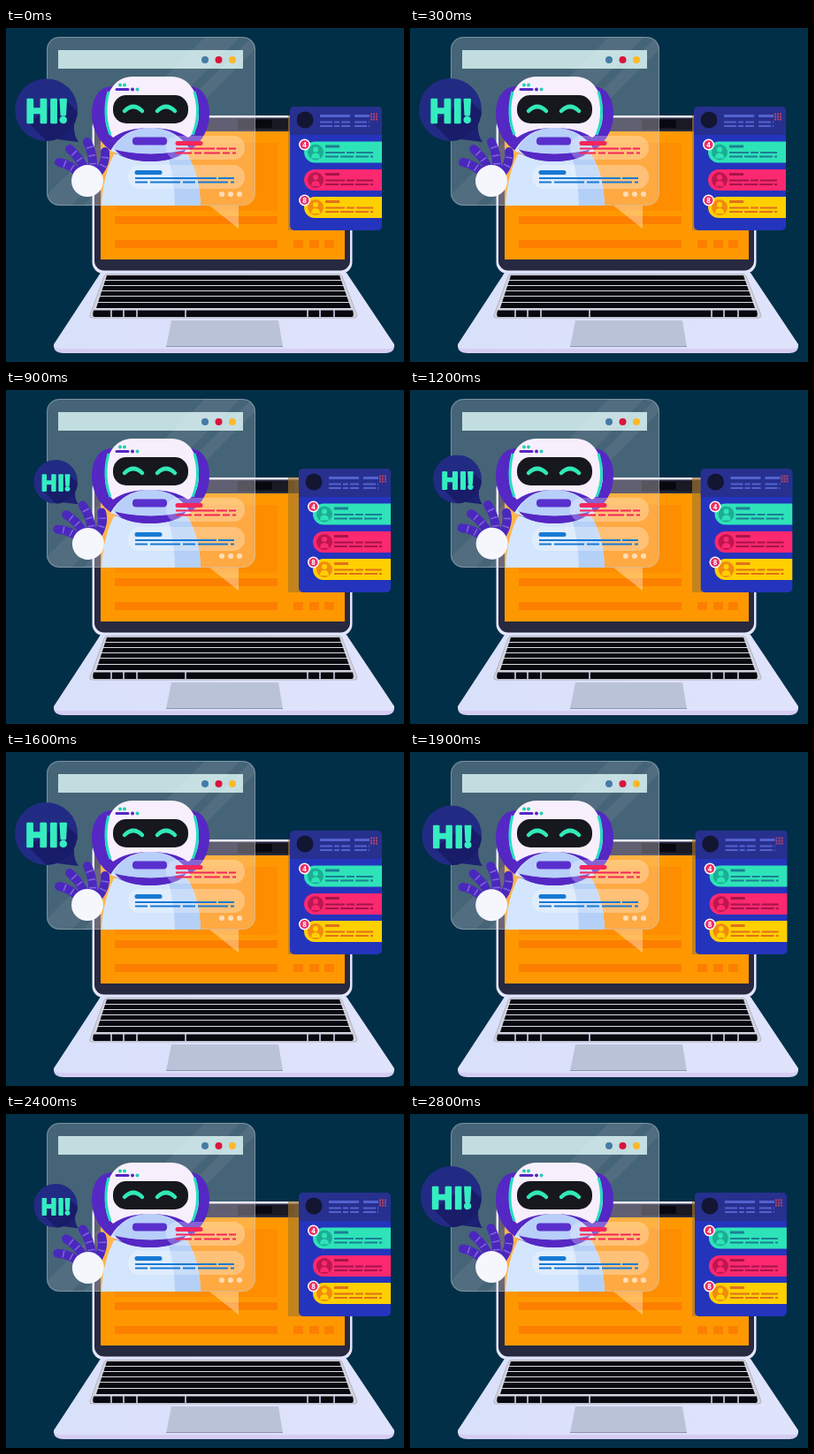
Recreate the animation shown at these times as an HTML page. Size 450 by 378 pixels, loop 2.9 s.

```html
<!DOCTYPE html>
<html lang="en">
<head>
<meta charset="utf-8">
<title>Chat robot</title>
<style>
html, body { margin: 0; width: 100%; height: 100%; overflow: hidden; background: #012f47; }
svg { display: block; }
text { font-family: "Open Sans", sans-serif; text-anchor: middle; }
</style>
</head>
<body>
<svg width="450" height="378" viewBox="0 0 450 378">
  <defs>
    <clipPath id="glass"><rect x="46" y="10" width="236" height="191" rx="14"/></clipPath>
    <clipPath id="card"><rect x="321" y="89" width="104" height="140" rx="5"/></clipPath>
    <clipPath id="disc"><circle cx="45.500" cy="92.500" r="35.500"/></clipPath>
    <linearGradient id="base" x1="0" x2="1"><stop stop-color="#d9e0fa"/><stop offset="1" stop-color="#e0e3fc"/></linearGradient>
  </defs>

  <!-- laptop screen -->
  <rect x="97.500" y="99" width="294" height="179" rx="13" fill="#e4e6fb"/>
  <rect x="100" y="101.500" width="289" height="173" rx="11" fill="#262940"/>
  <rect x="262" y="103" width="64" height="12" fill="#191a24"/>
  <rect x="281" y="104" width="20" height="9" rx="2" fill="#080910"/>
  <rect x="107" y="117" width="276" height="145" fill="#ff9800"/>
  <path fill="#ff8d00" d="M123 130H307V207H123Z"/>
  <path fill="#fc7f00" d="M123 213H307V222H123ZM123 240H307V249H123ZM325 240h11v9h-11zM343 240h11v9h-11zM360 240h11v9h-11z"/>
  <path fill="#a5782a" opacity=".65" d="M319 99H383V229H319Z"/>

  <!-- laptop base -->
  <path fill="#d6cdf3" d="M54 358H439V361Q438 368 429 368H65Q55 368 54 361Z"/>
  <path fill="url(#base)" d="M109 276H382Q385 276 387 280L439 358Q439 363 433 363H60Q54 363 54 358L105 280Q107 276 109 276Z"/>
  <path fill="#d2d3de" stroke="#b3b4c2" d="M115 278.500H376Q379 278.500 380 281L397 325Q397 328 394 328H97Q94 328 95 325L111 281Q112 278.500 115 278.500Z"/>
  <path fill="#08090f" d="M114 280H377L390 317H102ZM99 319.500H392Q394 327 391 327H100Q97 327 99 319.500Z"/>
  <path stroke="#d9dae6" stroke-width="1.200" d="M110 285.500H381M108 291.500H384M106 297.500H386M104 303.500H388M102 310.500H390"/>
  <path stroke="#dddcf9" stroke-width="1.500" d="M119 319v8M133 319v8M148 319v8M203 319v8M341 319v8M355 319v8M371 319v8"/>
  <path fill="#bac2d7" d="M187 331H308L313 361H181Z"/>
  <path stroke="#8e96ad" d="M181 360.500H313"/>

  <!-- glass window -->
  <path fill="#fff" opacity=".36" d="M230 201H263V227Z"/>
  <g clip-path="url(#glass)">
    <path fill="#fff2f6" opacity=".27" d="M46 10H282V201H46Z"/>
    <path fill="#c2dde0" d="M59 25H268V46H59Z"/>
    <path fill="#fff" opacity=".06" d="M225 10H265L74 201H46V189ZM278 10H282V24L105 201H87Z"/>
  </g>
  <rect x="46.500" y="10.500" width="235" height="190" rx="14" fill="none" stroke="#b9cbd2" opacity=".45"/>
  <circle cx="225" cy="36" r="4" fill="#457ba5"/>
  <circle cx="240.500" cy="36" r="4" fill="#d9143d"/>
  <circle cx="256" cy="36" r="4" fill="#fdb827"/>

  <!-- robot -->
  <path fill="#d4e6fd" d="M108 201C109 178 114 159 122 143H205Q219 166 220 201Z"/>
  <path fill="#b5d0f7" d="M182 143H205Q219 168 220 201H191Q190 165 182 143Z"/>
  <path fill="#5527c4" d="M120 66C105 66 97 80 97 97C97 130 125 151 163 151S230 130 230 97C230 80 222 66 207 66Z"/>
  <path fill="#d4e6fd" d="M118 139Q133 113 163 113T209 139Q189 149 163 149T118 139Z"/>
  <path fill="#5527c4" d="M122 136Q163 149 205 136Q194 151 163 151T122 136Z"/>
  <path fill="#b8cffa" d="M121 137Q135 113 163 113T206 137Q190 142 163 142T121 137Z"/>
  <path fill="#f7effc" d="M143 55H187C208 55 218 75 218 96C218 110 214 119 206 124Q190 113 163 113T121 124C115 119 112 110 112 96C112 75 122 55 143 55Z"/>
  <path fill="none" stroke="#23dfc0" stroke-width="3" d="M116 72Q109 97 118 121M213 72Q221 97 211 121"/>
  <rect x="121" y="76" width="85" height="32" rx="15" fill="#17171e"/>
  <path fill="none" stroke="#32e9b6" stroke-width="4.500" stroke-linecap="round" d="M134 94Q144 84 154 94M171 94Q181 84 191 94"/>
  <path stroke="#5527c4" stroke-width="3" stroke-linecap="round" d="M125 69.500H138"/>
  <circle cx="143" cy="69.500" r="2" fill="#5527c4"/>
  <g fill="#23cfae"><circle cx="148.500" cy="69.500" r="2"/><circle cx="129" cy="64.500" r="2"/><circle cx="134" cy="64.500" r="2"/></g>
  <rect x="143" y="123.500" width="39" height="9" rx="4" fill="#5930cd"/>

  <!-- messages -->
  <g fill="#fff">
    <g opacity=".28"><rect x="181" y="122" width="89" height="27" rx="13"/><rect x="138" y="155" width="132" height="27" rx="13"/></g>
    <g opacity=".6"><circle cx="244" cy="188" r="3"/><circle cx="254" cy="188" r="3"/><circle cx="264" cy="188" r="3"/></g>
  </g>
  <g fill="none" stroke-width="2">
    <g stroke="#f4265a">
      <path stroke-width="5" stroke-linecap="round" d="M194 130.500H220"/>
      <path stroke-dasharray="44 2 12 2" d="M192 136.500H260"/>
      <path stroke-dasharray="18 3 8 3" d="M192 141.500H260"/>
    </g>
    <g stroke="#1679d3">
      <path stroke-width="5" stroke-linecap="round" d="M148 163.500H174"/>
      <path stroke-dasharray="92 2" d="M146 170H258"/>
      <path stroke-dasharray="14 3 34 3" d="M146 174.500H258"/>
    </g>
  </g>

  <!-- contact card -->
  <g id="panel">
    <g clip-path="url(#card)">
      <path fill="#2434bd" d="M321 89H425V229H321Z"/>
      <path fill="#27308f" d="M321 89H425V121H321Z"/>
      <circle cx="338" cy="104" r="9.500" fill="#131632"/>
      <path stroke="#5362cf" stroke-width="3" d="M355 99.500H389M394 99.500H411"/>
      <path stroke="#5362cf" stroke-width="1.800" stroke-dasharray="14 2 6 2" d="M355 106.500H389M394 106.500H411M355 111H389M394 111H411"/>
      <path stroke="#b64466" stroke-width="2" stroke-dasharray="2 1" d="M412 97.500H420M412 100.500H420M412 103.500H420"/>
      <g id="rows"></g>
    </g>
    <g id="badges"></g>
  </g>

  <!-- greeting -->
  <g id="hello">
    <path fill="#1b2072" d="M58 126L82 129Q76 121 77 109Z"/>
    <g clip-path="url(#disc)">
      <path fill="#222b84" d="M10 57H81V128H10Z"/>
      <path fill="#181c69" d="M25 107L65 79L95 109V145H63Z"/>
    </g>
    <text x="45.500" y="106.500" font-size="35" font-weight="700" fill="#35edc0" stroke="#35edc0" stroke-width="2.500" stroke-linejoin="round">HI!</text>
  </g>
  <g id="hand" fill="none" stroke-linecap="round">
    <path id="fingers" stroke="#4b28bd" stroke-width="10" stroke-linejoin="round" d="M60 152Q72 154 83 165M72 137Q83 146 89 160M92 129Q99 142 98 160M112 140Q114 152 103 166"/>
    <path stroke="#8467da" stroke-width="8" stroke-linecap="butt" stroke-dasharray="1.500 8" stroke-dashoffset="-6" d="M60 152Q72 154 83 165M72 137Q83 146 89 160M92 129Q99 142 98 160M112 140Q114 152 103 166"/>
    <circle cx="92" cy="173" r="18" fill="#f6f6fd"/>
  </g>
</svg>
<script>
const el = id => document.getElementById(id);

const row = (y, fill, shade, ink) => `
  <path fill="${fill}" d="M349 ${y}H425V${y + 24}H349A12 12 0 0 1 349 ${y}Z"/>
  <circle cx="350" cy="${y + 12}" r="9" fill="${shade}"/>
  <g fill="${fill}"><circle cx="350" cy="${y + 9}" r="3"/><path d="M345 ${y + 19}Q345 ${y + 13} 350 ${y + 13}T355 ${y + 19}Z"/></g>
  <g stroke="${ink}" stroke-width="1.800">
    <path stroke-width="3" d="M361 ${y + 5.500}H377"/>
    <path stroke-dasharray="22 2 9 2" d="M361 ${y + 12.500}H415"/>
    <path stroke-dasharray="15 2" d="M361 ${y + 17}H415"/>
  </g>`;
const badge = (y, n) => `
  <circle cx="337.500" cy="${y}" r="6.500" fill="#fff"/>
  <circle cx="337.500" cy="${y}" r="5" fill="#ee2d65"/>
  <text x="337.500" y="${y + 3}" font-size="8" font-weight="700" fill="#fff">${n}</text>`;

el("rows").innerHTML = row(128.5, "#2ee3b8", "#1cae95", "#1b7f95")
  + row(160, "#fc2870", "#bd174e", "#a61448")
  + row(191, "#ffd000", "#f28a10", "#e0701c");
el("badges").innerHTML = badge(132, 4) + badge(195, 8);

const LOOP = 2900, HALF = 725, START = 160, STEP = 100;
const ease = u => u < .5 ? 16 * u ** 5 : 1 - 16 * (1 - u) ** 5;

// Swings 0 -> 1 -> 0, twice per loop
function swing(t) {
  const p = (t - START + LOOP) % (2 * HALF) / HALF;
  return ease(p < 1 ? p : 2 - p);
}

function draw(now) {
  const f = swing(Math.floor(now % LOOP / STEP) * STEP);
  el("panel").setAttribute("transform", `translate(${10 * f} 0)`);
  el("hello").setAttribute("transform", `translate(81 130) scale(${1 - .3 * f}) translate(-81 -130)`);
  el("hand").setAttribute("transform", `translate(${f} ${f}) rotate(${-8 * f} 92 174)`);
  requestAnimationFrame(draw);
}
draw(performance.now());
</script>
</body>
</html>
```
